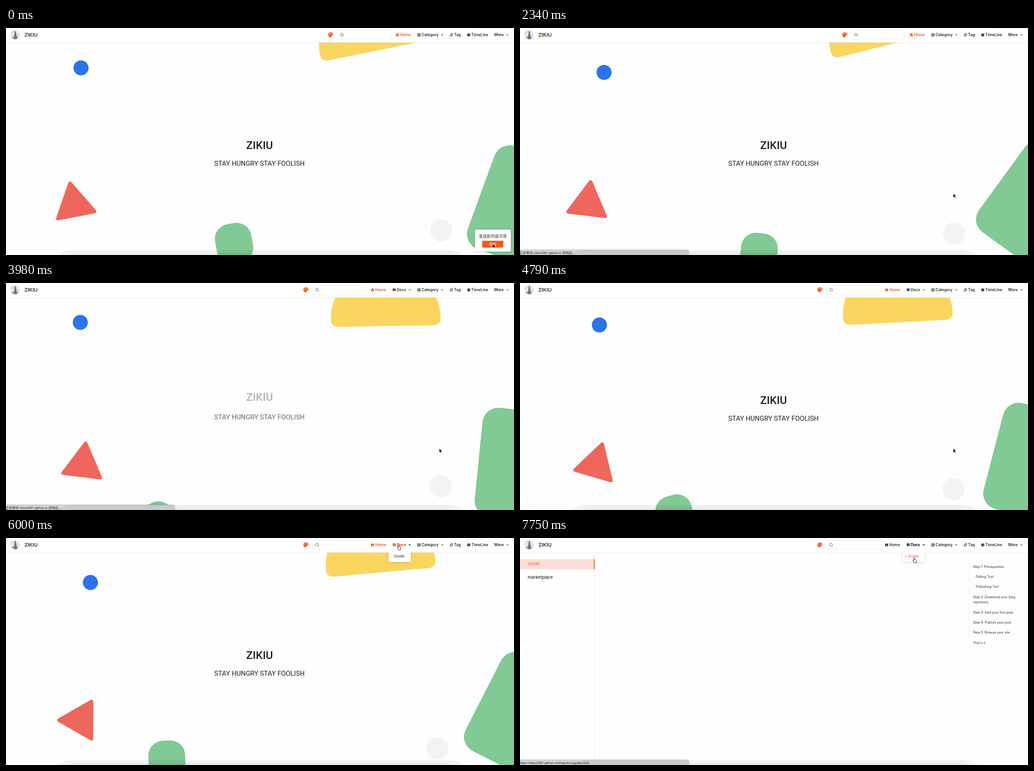
Recreate the animation shown at these times as an HTML page. Size 1118 px wide and 501 px high, loop 8000 ms.

```html
<!DOCTYPE html>
<html lang="en">
<head>
<meta charset="utf-8">
<title>Blog home</title>
<style>
html, body { margin: 0; width: 100%; height: 100%; overflow: hidden; background: #fefefe; }
svg { display: block; width: 1118px; height: 501px; }
text { font-family: Inter, "Noto Sans CJK SC", "Noto Sans CJK", sans-serif; fill: currentColor; white-space: pre; }
svg { color: #2a2b2d; --accent: #f4581f; }
.nav { font-size: 8.4px; font-weight: 600; }
.nav .ico, .arrow { fill: currentColor; }
.arrow { opacity: .55; }
.accent { color: var(--accent); }
.hero text { font-family: Roboto, sans-serif; text-anchor: middle; fill: #1d1f21; }
.card { fill: #fff; filter: drop-shadow(0 1px 2px rgba(0,0,0,.2)); }
.status text { font: 7.4px "Liberation Sans", "Noto Sans CJK SC", "Noto Sans CJK", sans-serif; fill: #222; }
.toc text { font-size: 7.1px; }
.line { stroke: #ececec; fill: none; }
</style>
</head>
<body>
<svg viewBox="0 0 1118 501">
  <defs>
    <linearGradient id="sky" x2=".6" y2="1">
      <stop offset="0" stop-color="#9fd4d6"/><stop offset=".5" stop-color="#e3efef"/><stop offset="1" stop-color="#d9d3dc"/>
    </linearGradient>
    <linearGradient id="bar" x2="0" y2="1">
      <stop offset="0" stop-color="#ccd2d6"/><stop offset="1" stop-color="#dee1e3"/>
    </linearGradient>
    <linearGradient id="shade" x2="0" y2="1">
      <stop offset="0" stop-opacity=".04"/><stop offset=".2" stop-opacity=".13"/>
    </linearGradient>
    <clipPath id="round"><circle cx="20" cy="14.7" r="10.2"/></clipPath>
    <path id="tri" d="M-2.7-1.5H2.7L0 2.4Z"/>
  </defs>

  <g id="home">
    <path id="yellow" fill="#fbd561" d="M-121-15A121 121 0 0 1 121-15A15 15 0 0 1 106 0H-106A15 15 0 0 1-121-15Z"/>
    <circle id="blue" r="16.6" fill="#2c74e9"/>
    <path id="red" d="M0-47.5L41.1 23.75H-41.1Z" fill="#ee675c" stroke="#ee675c" stroke-width="8" stroke-linejoin="round"/>
    <rect id="leaf" x="-40.5" y="-44" width="81" height="88" rx="33" fill="#81c995"/>
    <rect id="slab" x="-120.5" y="-120.5" width="241" height="241" rx="35" fill="#81c995"/>
    <circle id="grey" r="24.5" fill="#f3f3f3"/>
    <g class="hero">
      <text id="title" x="558" y="266.7" font-size="24" font-weight="500">ZIKIU</text>
      <text id="motto" x="557.7" y="304" font-size="14.8">STAY HUNGRY STAY FOOLISH</text>
    </g>
  </g>

  <g id="guide">
    <path class="line" d="M164.5 33V501M988.5 53V242"/>
    <path d="M0 46.5H164V69H0Z" fill="#fbe0d8"/>
    <path d="M162.5 46.5h2V69h-2Z" fill="#f4581f"/>
    <text class="accent" x="17" y="60.4" font-size="9.4">Guide</text>
    <text x="17" y="90.4" font-size="9.3" font-weight="500">marketplace</text>
    <g class="toc">
      <text x="997" y="65.6">Step 1: Prerequisites</text>
      <text x="1003" y="88">Editing Tool</text>
      <text x="1003" y="110.2">Publishing Tool</text>
      <text x="997" y="132.6">Step 2: Download your blog</text>
      <text x="997" y="144.2">repository</text>
      <text x="997" y="166.6">Step 3: Add your first post</text>
      <text x="997" y="188.8">Step 4: Publish your post</text>
      <text x="997" y="211.2">Step 5: Browse your site</text>
      <text x="997" y="233.6">That's it</text>
    </g>
  </g>

  <g class="nav">
    <path d="M0 0H1118V32.3H0Z" fill="#fff" style="filter:drop-shadow(0 .6px .8px rgba(0,0,0,.17))"/>
    <g clip-path="url(#round)">
      <path d="M9 4h22v22H9Z" fill="url(#sky)"/>
      <path d="M20 6l2 3 1 7 3 9H14l4-8 1-8Z" fill="#786f88"/>
      <path d="M10 21l6-3 2 8h-8Z" fill="#aeb9a4"/>
    </g>
    <text x="40.6" y="19.4" font-size="11">ZIKIU</text>
    <path id="loading" d="M1035 0H1118V1H1035Z" fill="#f9cfc2" opacity=".7"/>

    <g id="left">
      <path d="M714.5 9.4a5.6 5.4 0 0 0-5.6 5.6c0 3.3 2.8 5.7 5.6 5.7 1.6 0 1.2-1.3 1-2-.2-1 .4-1.500 1.400-1.500h1.700c1 0 1.500-1 1.500-2.200 0-3.200-2.500-5.600-5.600-5.600Z" fill="#f4581f"/>
      <g fill="#fff"><circle cx="711.3" cy="15.300" r=".9"/><circle cx="712.900" cy="12.300" r=".9"/><circle cx="716.100" cy="12.300" r=".9"/><circle cx="717.900" cy="14.800" r=".9"/></g>
      <rect class="line" x="729.5" y="5.5" width="118" height="19.300" rx="3"/>
      <path d="M741.200 16.700l2 2M738.800 11.600a3 3 0 1 0 .01 0Z" fill="none" stroke="#555" stroke-width="1"/>
      <g id="homeLink">
        <path class="ico" d="M861.200 11.200l4 3.800h-1v3.800h-2.100v-2.600h-1.800v2.600h-2.100V15h-1Z"/>
        <text x="867" y="18.200">Home</text>
      </g>
    </g>
    <g id="docs">
      <path class="ico" d="M851 12.300h6.500v5h-2.400l-.9 1.200-.9-1.200H851Z"/>
      <path d="M852.500 14.800h3.500" stroke="#fff" stroke-width=".9"/>
      <text x="860" y="18.200">Docs</text>
    </g>
    <use id="docsArrow" class="arrow" href="#tri" x="888.500" y="15.200"/>
    <path class="ico" d="M905.600 12.300h2.800v2.600h-2.800ZM909.300 12.300h2.800v2.600h-2.800ZM905.600 15.900h2.800v2.600h-2.800ZM909.300 15.900h2.800v2.600h-2.800Z"/>
    <text x="914.500" y="18.200">Category</text>
    <use class="arrow" href="#tri" x="960" y="15.200"/>
    <path d="M979.700 12.900l2.700-.2.300 2.700-3.100 3-2.300-2.500Z" fill="none" stroke="currentColor" stroke-width="1.100"/>
    <text x="986" y="18.200">Tag</text>
    <circle class="ico" cx="1018.400" cy="15.300" r="3.300"/>
    <path d="M1018.400 13.400v2.100h1.600" fill="none" stroke="#fff" stroke-width=".8"/>
    <text x="1024" y="18.200">TimeLine</text>
    <text x="1074.500" y="18.200">More</text>
    <use class="arrow" href="#tri" x="1103.500" y="15.200"/>
  </g>

  <g id="menu" font-size="8.200">
    <path d="M842 31.500h49V51q0 2-2 2h-45q-2 0-2-2Z" class="card"/>
    <path d="M842 26h49v7h-49Z" fill="#fff"/>
    <use href="#docs"/><use href="#docsArrow"/>
    <g id="menuItem">
      <circle id="bullet" cx="848.700" cy="40.200" r="1.300" fill="currentColor"/>
      <text x="854" y="43">Guide</text>
    </g>
  </g>

  <g id="popup">
    <rect class="card" x="1032" y="445" width="79" height="48.500" rx="2"/>
    <text x="1071.300" y="463.200" font-size="8.800" text-anchor="middle">发现新内容可用</text>
    <rect x="1048" y="469.500" width="46.500" height="15.300" rx="2" fill="#f4581f"/>
    <text x="1071.200" y="480.300" font-size="8" text-anchor="middle" style="fill:#fff">刷新</text>
  </g>

  <g id="status" class="status">
    <path d="M-5 490H368q3 0 3 3V506H-5Z" fill="url(#bar)" stroke="#b4b8bb" stroke-width=".6" style="filter:drop-shadow(0 -1px 1.500px rgba(0,0,0,.12))"/>
    <text id="statusText" x="-1.500" y="498.800"></text>
  </g>
  <rect x="100" y="490" width="920" height="80" rx="45" fill-opacity=".05"/>
  <rect x="114" y="496" width="892" height="80" rx="45" fill="url(#shade)" opacity=".55"/>

  <path id="arrow" d="M0 0V9.300L2.100 7.400 3.600 10.900 5.200 10.200 3.700 6.800H6.600Z" stroke="#fff" stroke-width=".7"/>
  <path id="hand" d="M-2.200-4.500q0-1.200 1-1.200t1 1.200V-1.500L2.800-.9q1.400.3 1.300 1.600L3.500 3.500V5.300H-1.500V3.800L-4 .8q-.4-1 .5-1.200L-2.200.5Z" fill="#fff" stroke="#111" stroke-width=".9"/>
</svg>
<script>
const LOOP = 8000, RELOAD = 3390, LEAVE = 7390, GUIDE = 7570;
const $ = id => document.getElementById(id);

const ticks = [0, 150, 320, 490, 650, 815, 980, 1160, 1330, 1600, 1810, 2340, 3390,
  3980, 4190, 4390, 4590, 4790, 5030, 5260, 5540, 5770, 6000,
  6290, 6500, 6720, 6930, 7150, 7390, 7570, 7750];

// Poses are [x, y, angle]: three before the reload, three after it.
const times = [[0, 980, 1600], [3980, 4790, 6000]];
const shapes = {
  blue: [[[165, 88], [177.7, 94.3], [185, 98]], [[163.5, 87], [174.7, 92.7], [185.8, 98.2]]],
  grey: [[[958, 447], [956.7, 449.5], [954.7, 453.5]], [[957, 448.5], [954, 455], [949.5, 464]]],
  red: [[[150, 389.5, -11], [150, 388, 1], [149.5, 387, 7]],
    [[169.4, 401, 7], [167.4, 401.5, 16.5], [164.3, 402, 30]]],
  leaf: [[[502, 475, -10], [517.5, 488, 0], [525.7, 496.7, 6]],
    [[333.5, 528, -28], [341, 512, -16], [354.2, 491, -2]]],
  slab: [[[1159, 403.6, 20], [1158.3, 404, 29.2], [1158, 403.5, 36]],
    [[1160, 404, 5.7], [1158.6, 403.4, 14.5], [1158, 401.5, 27]]],
  yellow: [[[812.9, 50.6, -11.5], [807.6, 42.7, -13.3], [805, 38.5, -14.2]],
    [[836, 95, -1], [832.3, 86.7, -3], [826, 75.8, -5.2]]]
};

const pointer = [[0, 1071, 476], [2340, 953.5, 365], [5540, 905, 160],
  [5770, 867, 25], [6000, 865, 21], [6290, 866, 34], [6500, 868.5, 49]];

const last = (list, t, key = v => v) => list.filter(v => key(v) <= t).pop();
const ramp = (t, a, b) => Math.min(1, Math.max(0, (t - a) / (b - a)));
const show = (id, opacity) => {
  $(id).style.display = opacity ? "" : "none";
  $(id).style.opacity = +opacity;
};
const place = (id, x, y, angle = 0) =>
  $(id).setAttribute("transform", `translate(${x} ${y}) rotate(${angle})`);
const tint = (id, on) => $(id).classList.toggle("accent", on);

function pose(poses, at, t) {
  const i = t < at[1] ? 0 : 1;
  const k = (t - at[i]) / (at[i + 1] - at[i]);
  return poses[i].map((v, n) => v + (poses[i + 1][n] - v) * k);
}

function drop(id, p) {
  show(id, p);
  place(id, 0, -10 * (1 - p));
}

function draw(t) {
  const fresh = t >= RELOAD, page = fresh ? 1 : 0;
  const inGuide = t >= GUIDE, menu = t >= 5770, onItem = t >= 6500;

  show("home", inGuide ? 0 : t >= LEAVE ? .5 : 1);
  show("guide", inGuide);
  const clock = fresh ? t : Math.min(t, 1600);
  for (const id in shapes) place(id, ...pose(shapes[id][page], times[page], clock));
  drop("title", fresh ? ramp(t, 3900, 4140) : 1);
  drop("motto", fresh ? ramp(t, 3820, 4060) : 1);

  show("loading", fresh ? 0 : .7);
  place("left", fresh ? -54.5 : 0, 0);
  show("docs", fresh);
  show("docsArrow", fresh ? .55 : 0);
  tint("homeLink", !inGuide);
  tint("docs", menu && t < 6290);

  show("menu", menu);
  tint("menuItem", onItem);
  show("bullet", onItem);
  show("popup", t < 1600 ? 1 : t < 1810 ? .5 : 0);

  const waiting = t >= 1810 && t < 4190;
  show("status", waiting || onItem);
  $("statusText").textContent = waiting
    ? "正在等待 zikiu2087.github.io 的响应..."
    : "https://zikiu2087.github.io/blog/docs/guide.html";

  const [, x, y] = last(pointer, t, p => p[0]);
  show("arrow", !menu);
  show("hand", menu);
  place(menu ? "hand" : "arrow", x, y);
}

let shown = -1;
function frame() {
  const t = last(ticks, performance.now() % LOOP);
  if (t !== shown) draw(shown = t);
  requestAnimationFrame(frame);
}
frame();
</script>
</body>
</html>
```
